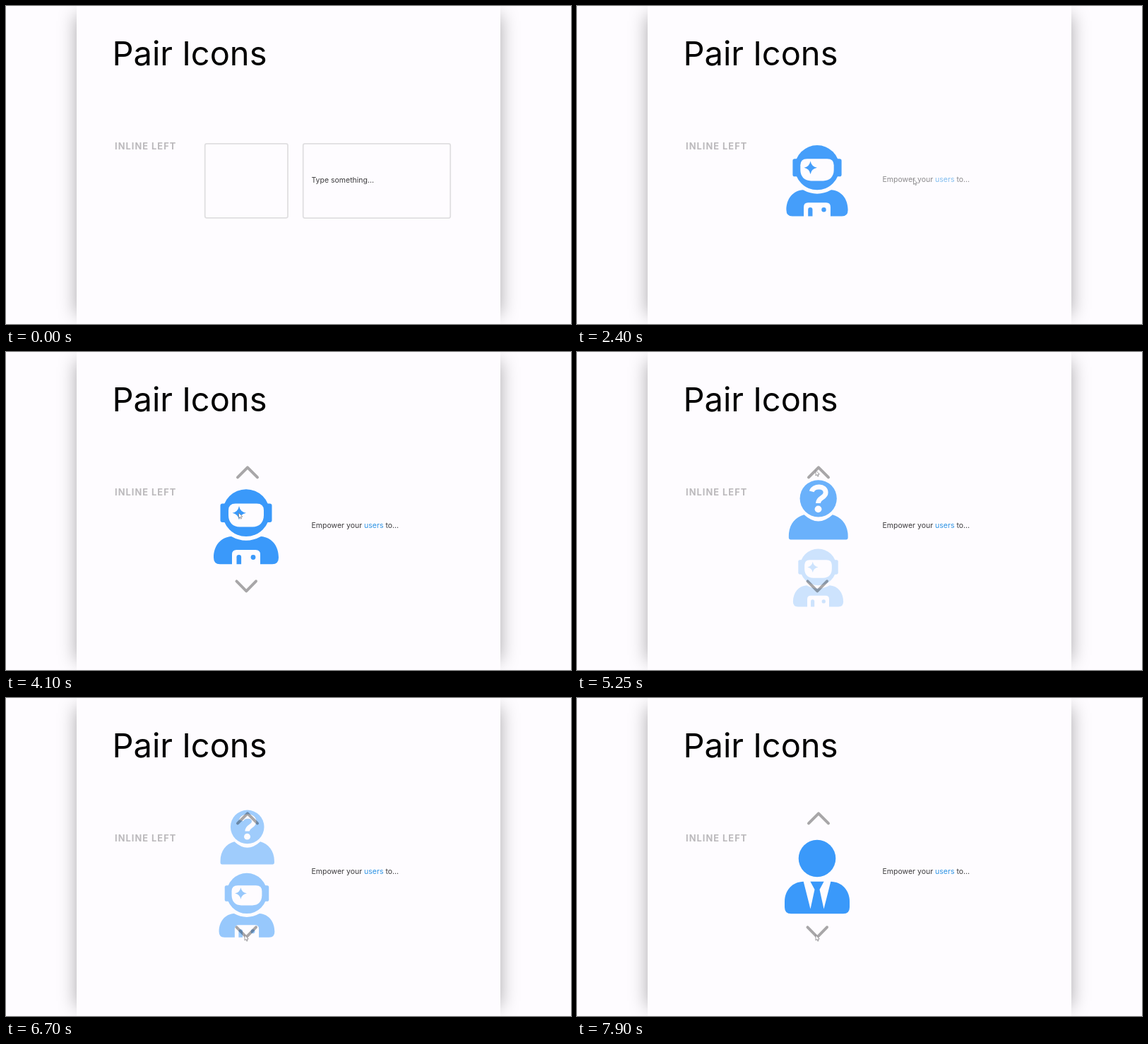
Write an HTML page that moves like this. It is 800 by 450 pixels and loops after 8000 ms.

```html
<!DOCTYPE html>
<html lang="en">
<head>
<meta charset="utf-8">
<title>Pair Icons</title>
<style>
  html, body { margin: 0; width: 100%; height: 100%; overflow: hidden; background: #fefcff; }
  .shadow { position: absolute; left: 100px; top: 13px; width: 600px; height: 424px; box-shadow: 0 0 24px rgba(0, 0, 0, .34); }
  .panel { position: absolute; left: 100px; top: 0; width: 600px; height: 450px; background: #fefcff; }
  svg { position: absolute; left: 0; top: 0; width: 800px; height: 450px; font-family: Inter, "Open Sans", sans-serif; }
  .title { font-size: 47px; font-weight: 400; fill: #000; }
  .label { font-size: 12.8px; font-weight: 700; letter-spacing: 1.05px; fill: #bbb9bc; }
  .field { font-size: 10.5px; fill: #3c3b3d; }
  .box { fill: none; stroke: #e0dfe1; stroke-width: 1.8; }
  .icon { fill: #3a99fa; }
  .cut { fill: #fefcff; }
  .chevron { fill: none; stroke: #000; stroke-opacity: .34; stroke-width: 4; stroke-linecap: round; stroke-linejoin: round; }
</style>
</head>
<body>
<div class="shadow"></div>
<div class="panel"></div>
<svg viewBox="0 0 800 450">
  <text class="title" x="150.500" y="84">Pair Icons</text>
  <text class="label" x="154" y="202.500">INLINE LEFT</text>

  <rect id="boxA" class="box" x="281.700" y="194.900" width="117.300" height="104.900" rx="2.500"/>
  <rect id="boxB" class="box" x="420.700" y="194.900" width="208.500" height="105.200" rx="2.500"/>
  <text id="hint" class="field" x="432.500" y="249.800">Type something...</text>
  <text id="phrase" class="field" x="432.500" y="249">Empower your <tspan fill="#2b92e4">users</tspan> to...</text>

  <g id="guest" class="icon">
    <circle cx="341.700" cy="229.700" r="28.200"/>
    <path d="M296.500 290V287C296.500 270 306 258 320 254.500Q341.700 274.500 363.500 254.500C377 258 387 270 387 287V290Q387 292.500 384.500 292.500H299Q296.500 292.500 296.500 290Z"/>
    <path d="M331.500 219C334 209.500 353 209.500 353 220.500C353 229 341.500 228 341.500 237" fill="none" stroke="#fefcff" stroke-width="7.500"/>
    <circle class="cut" cx="341.500" cy="246" r="5.300"/>
  </g>

  <g id="astro" class="icon">
    <rect x="303.500" y="214.500" width="12" height="26.500" rx="3"/>
    <rect x="364.500" y="214.500" width="12" height="26.500" rx="3"/>
    <circle cx="340" cy="227.700" r="33.400"/>
    <path class="cut" d="M325 214.500H355Q365 214.500 365 224V231C365 241 359 247.500 349 247.500H331C321 247.500 315 241 315 231V224Q315 214.500 325 214.500Z"/>
    <path d="M330 218Q331.500 226.200 340 227.800Q331.500 229.400 330 237.500Q328.500 229.400 320.500 227.800Q328.500 226.200 330 218Z"/>
    <path d="M294 291C294 274 304 262 319 261Q340 272.500 361 261C376 262 386 274 386 291Q386 300.300 377 300.300H303Q294 300.300 294 291Z"/>
    <path class="cut" d="M320 301V286.500Q320 280 326.500 280H353.500Q360 280 360 286.500V301Z"/>
    <path d="M326.500 300.300V290.300a3.300 3.300 0 0 1 6.600 0V300.300Z"/>
    <circle cx="350" cy="290.500" r="3.400"/>
  </g>

  <g id="boss" class="icon">
    <circle cx="340" cy="227" r="26.300"/>
    <path d="M294 296V288C294 272 305 260 321 259.700H359C375 260 386 272 386 288V296Q386 305.300 377 305.300H303Q294 305.300 294 296Z"/>
    <path class="cut" d="M320.500 259H330L336.500 271L330.500 298.500ZM359.500 259H350L343.500 271L349.500 298.500Z"/>
  </g>

  <path id="up" class="chevron" d="M328 177.300L342 163.300L356 177.300"/>
  <path id="down" class="chevron" d="M326.500 324.300L340.300 338.300L354 324.300"/>

  <path id="cursor" d="M0 0V8.600L2 6.900L3.300 9.900L4.700 9.300L3.400 6.400H6.200Z" fill="#fff" stroke="#77757a" stroke-width=".8" stroke-linejoin="round"/>
</svg>
<script>
const LOOP = 8000, MID = 247, GAP = 96;
const el = id => document.getElementById(id);
const smooth = k => (1 - Math.cos(Math.PI * k)) / 2;

// Value at time t from [time, value] pairs, eased between neighbours.
function track(t, keys) {
  if (t <= keys[0][0]) return keys[0][1];
  for (let i = 1; i < keys.length; i++) {
    const [t0, a] = keys[i - 1], [t1, b] = keys[i];
    if (t < t1) return a + (b - a) * smooth((t - t0) / (t1 - t0));
  }
  return keys[keys.length - 1][1];
}

function place(node, cx, cy, scale, dx, dy, opacity) {
  node.setAttribute("transform",
    `translate(${cx + dx} ${cy + dy}) scale(${scale}) translate(${-cx} ${-cy})`);
  node.setAttribute("opacity", opacity);
}

const slide = [[4950, 0], [5400, -1], [6470, -1], [6920, 0], [7390, 0], [7840, 1]];
const cursorX = [[500, 720], [1300, 476.5], [3150, 476.5], [3850, 329.5], [4450, 329.5], [4800, 338]];
const cursorY = [[500, 62], [1300, 245], [3150, 245], [3850, 227.5], [4450, 227.5], [4800, 167.5],
  [5450, 167.5], [6400, 335.5]];
const clicks = [1500, 4900, 6450, 7380];
const icons = [
  { node: el("guest"), cx: 341.7, slot: -1, drift: 0 },
  { node: el("astro"), cx: 340, slot: 0, drift: 2 },
  { node: el("boss"), cx: 340, slot: 1, drift: 2 }
];

function draw(t) {
  // Empty field turns into icon and phrase.
  const leave = track(t, [[1900, 0], [2350, 1]]);
  place(el("boxA"), 340.5, MID, 1 + .08 * leave, 0, 0, 1 - leave);
  place(el("boxB"), 525, MID, 1 + .055 * leave, 0, 0, 1 - leave);
  el("hint").setAttribute("opacity", track(t, [[1900, 1], [2250, 0]]));
  el("phrase").setAttribute("opacity", track(t, [[2150, 0], [2600, 1]]));

  const show = track(t, [[1860, 0], [2500, 1]]);
  const grow = track(t, [[1860, .69], [2600, 1]]);
  const pos = track(t, slide);
  for (const { node, cx, slot, drift } of icons) {
    const off = slot - pos, far = Math.min(1, Math.abs(off));
    place(node, cx, MID, (1 - .3 * far) * grow, drift * far, off * GAP, (1 - far) * show);
  }

  // Arrows spring outward on hover.
  const fade = track(t, [[3500, 0], [3800, 1]]);
  const push = track(t, [[3500, -10], [3850, 4], [4080, 0]]);
  place(el("up"), 342, 170, 1, 0, -push, fade);
  place(el("down"), 340, 331, 1, 0, push, fade);

  let size = .87;
  for (const c of clicks) size -= track(t, [[c - 20, 0], [c + 60, .2], [c + 150, 0]]);
  place(el("cursor"), 0, 0, size, track(t, cursorX), track(t, cursorY), track(t, [[500, 0], [700, 1]]));
}

function frame() {
  draw(performance.now() % LOOP);
  requestAnimationFrame(frame);
}
draw(0);
requestAnimationFrame(frame);
</script>
</body>
</html>
```
